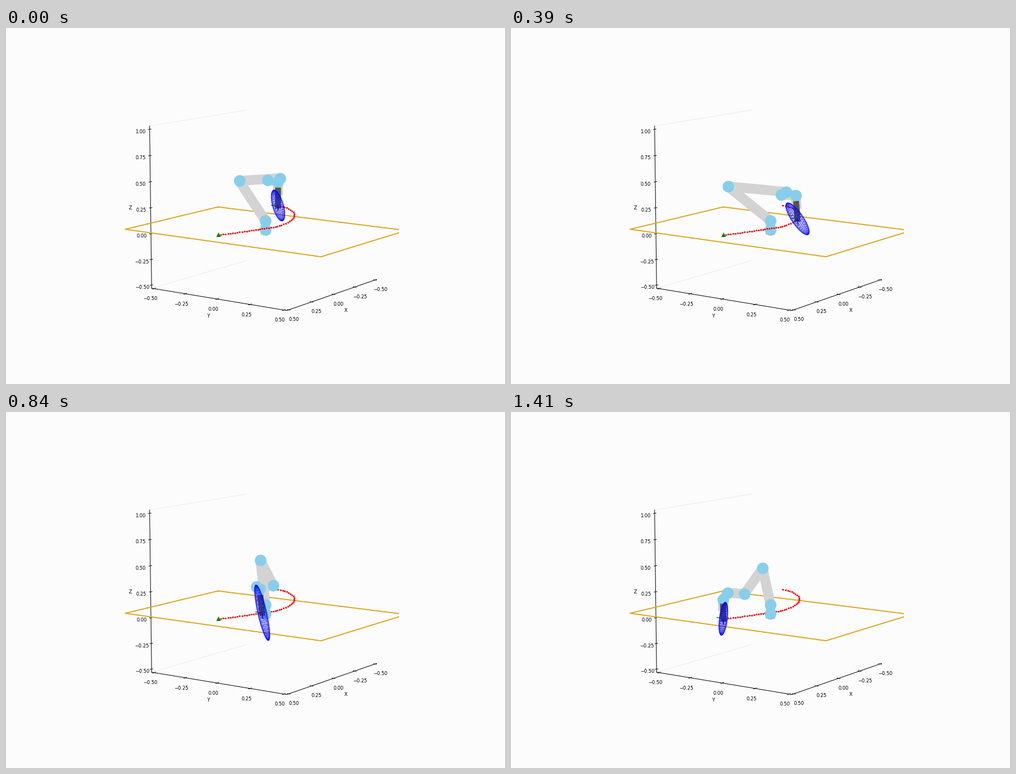
Animation of 885x632 px, one loop 1440 ms. Source, as a matplotlib script:

```python
import numpy as np
import matplotlib.pyplot as plt
from matplotlib.animation import FuncAnimation
from matplotlib.collections import LineCollection
from matplotlib.patches import Rectangle

W, H, DPI = 885, 632, 100
FRAMES, INTERVAL = 48, 30
PX = 72 / DPI  # points per pixel

# Camera: direction, distance (in half boxes), zoom and screen centre.
AZIM, ELEV = np.radians(35), np.radians(10)
DIST, ZOOM, CENTER = 20, 2890, (460.2, 313.0)
BOX_MID, BOX_HALF = np.array([0, 0, 0.25]), np.array([0.5, 0.5, 0.75]) * 25 / 24
UP = np.array([0, 0, 1])
NEAR = np.array([np.cos(AZIM), np.sin(AZIM), 0])
RIGHT = np.array([-np.sin(AZIM), np.cos(AZIM), 0])

# Arm lengths in metres: column, two links, three wrist offsets, tool included.
COLUMN, UPPER, FORE = 0.0892, 0.425, 0.392
SIDE, FRONT, FLANGE, REACH = 0.109, 0.0947, 0.0823, 0.225

# Waypoints of the tool tip: frame, then x, y, z.
WAYPOINTS = np.array([
    [0, 0.152, 0.202, 0.302], [5, 0.073, 0.227, 0.257],
    [9, 0.025, 0.238, 0.201], [13, 0.036, 0.233, 0.1535],
    [19, 0.129, 0.2115, 0.112], [30, 0.306, 0.156, 0.103],
    [47, 0.539, 0.025, 0.086]])
SLANTS = np.array([[0, 0.56], [20, 0.84], [28, 0.8], [35, 0.3], [47, -0.42]])
CROSSING = 23  # from here on the arm stands in front of the path


def smooth(keys):
    """Sample a cubic curve through (frame, values...) keys at every frame."""
    t, v = keys[:, 0], keys[:, 1:]
    slope = np.gradient(v, t, axis=0, edge_order=2)
    f = np.arange(FRAMES)
    i = np.clip(np.searchsorted(t, f, side="right") - 1, 0, len(t) - 2)
    h = (t[i + 1] - t[i])[:, None]
    s = (f - t[i])[:, None] / h
    return ((1 + 2 * s) * (1 - s) ** 2 * v[i] + s * (1 - s) ** 2 * h * slope[i]
            + s ** 2 * (3 - 2 * s) * v[i + 1] + s ** 2 * (s - 1) * h * slope[i + 1])


def bump(x, mid, width):
    return np.exp(-((x - mid) / width) ** 2)


def project(points):
    """World points to stage pixels, in perspective."""
    p = (np.asarray(points, float) - BOX_MID) / BOX_HALF
    near, side, up = p @ NEAR, p @ RIGHT, p[..., 2]
    depth = DIST - np.cos(ELEV) * near - np.sin(ELEV) * up
    rise = np.cos(ELEV) * up - np.sin(ELEV) * near
    return np.stack([CENTER[0] + ZOOM * side / depth,
                     CENTER[1] - ZOOM * rise / depth], axis=-1)


def solve_arm(frame, tip):
    """Joint positions, from the base to the tool mount, that reach the tip."""
    tilt = np.radians(24) * np.clip((frame - 27) / 20, 0, 1)
    sway = 0.016 * np.sin(np.pi * frame / (FRAMES - 1))
    tool = sway * RIGHT - REACH * (np.sin(tilt) * NEAR + np.cos(tilt) * UP)
    wrist3 = tip - tool

    out = np.sqrt(wrist3[0] ** 2 + wrist3[1] ** 2 - SIDE ** 2)
    turn = np.arctan2(wrist3[1], wrist3[0]) + np.arctan2(SIDE, out)
    ahead = np.array([np.cos(turn), np.sin(turn), 0])
    aside = np.array([np.sin(turn), -np.cos(turn), 0])
    wrist2 = wrist3 - FRONT * (np.cos(tilt) * ahead - np.sin(tilt) * UP)
    wrist1 = wrist2 - SIDE * aside

    shoulder = COLUMN * UP
    span = wrist1 - shoulder
    r = np.linalg.norm(span)
    bend = np.arccos((UPPER ** 2 + r ** 2 - FORE ** 2) / (2 * UPPER * r))
    lift = np.arctan2(span[2], span @ ahead) + bend
    elbow = shoulder + UPPER * (np.cos(lift) * ahead + np.sin(lift) * UP)
    mount = wrist3 + tool * FLANGE / REACH
    return np.array([0 * UP, shoulder, elbow, wrist1, wrist2, wrist3, mount])


def wireframe(center, hx, hy, slant, tilt=0.2, n=20):
    """Projected meridians and parallels of an ellipsoid."""
    cov = np.array([[hx ** 2, slant * hx * hy], [slant * hx * hy, hy ** 2]])
    size, axes = np.linalg.eigh(cov)
    minor, major = (np.sqrt(size) * axes).T

    def place(u, v):
        a = np.sin(v) * np.cos(u)
        b = np.cos(v) * np.cos(tilt) + np.sin(v) * np.sin(u) * np.sin(tilt)
        return center + a[:, None] * minor + b[:, None] * major

    around, down = np.linspace(0, 2 * np.pi, 49), np.linspace(0, np.pi, 33)
    return ([place(u, down) for u in 2 * np.pi * np.arange(n) / n]
            + [place(around, v) for v in np.pi * np.arange(1, n) / n])


fig = plt.figure(figsize=(W / DPI, H / DPI), dpi=DPI, facecolor="#fcfcfc")
ax = fig.add_axes([0, 0, 1, 1])
ax.set_xlim(0, W)
ax.set_ylim(H, 0)
ax.set_axis_off()


def line(points, color, width, z, **kw):
    x, y = np.transpose(points)
    return ax.plot(x, y, color=color, lw=width * PX, zorder=z, **kw)[0]


def dots(color, marker, size, z):
    return line([(0, 0)], color, 0, z, marker=marker, ls="", ms=size * PX, mew=0)


def label(x, y, text):
    ax.text(x, y, text, ha="center", va="center", fontsize=8.33 * PX,
            family="DejaVu Sans")


def corner(*signs):
    return BOX_MID + BOX_HALF * signs


def draw_axis(axis, edge, values, stroke, shift):
    """One box edge with its ticks and numbers; `edge` is its lower corner."""
    start, end = corner(*edge), corner(*edge)
    end[axis] += 2 * BOX_HALF[axis]
    line(project([start, end]), "black", 1, 1)
    for v in values:
        start[axis] = v
        mark = project(start)
        line([mark - stroke, mark + stroke], "black", 0.9, 1)
        label(*(mark + shift), f"{v:.2f}".replace("-", "\u2212"))


def draw_stage():
    for z in (-1, 1):
        line(project([corner(1, -1, z), corner(-1, -1, z)]), "#e6e6e6", 0.8, 0)
    span = np.linspace(-0.5, 0.5, 5)
    draw_axis(0, (-1, 1, -1), span, np.array([2.8, 0.5]), (9, 17.5))
    draw_axis(1, (1, -1, -1), span, np.array([2.7, -0.9]), (-6.7, 18.2))
    draw_axis(2, (1, -1, -1), np.linspace(-0.5, 1, 7), np.array([2.6, -0.4]),
              (-16.8, 4.3))
    label(603, 501, "X")
    label(359, 511.5, "Y")
    label(220.5, 319.5, "Z")

    floor = [(-0.5, -0.75, 0), (0.5, -0.75, 0), (0.5, 0.75, 0), (-0.5, 0.75, 0)]
    rim = line(project(floor + floor[:1]), "goldenrod", 1.9, 2)
    rim.set_clip_path(Rectangle((0, 0), 697, H, transform=ax.transData))


draw_stage()
tips = smooth(WAYPOINTS)
slants = smooth(SLANTS)[:, 0]
path = project(tips)

links = line([(0, 0)], "lightgray", 17.5, 4, solid_capstyle="projecting",
             solid_joinstyle="round")
joints = dots("skyblue", "o", 20.5, 5)
tool = line([(0, 0)], "#555555", 10.5, 5.5, solid_capstyle="projecting")
trail = dots("red", "o", 3.1, 6)
trail.set_data(*path.T)
goal = dots("green", "^", 7.2, 6)
goal.set_data(*path[-1:].T)
triad = [line([(0, 0)], c, 1.4, 7) for c in ("red", "green", "blue")]
ellipsoid = LineCollection([], colors="blue", linewidths=0.9 * PX, alpha=0.47,
                           zorder=8)
ax.add_collection(ellipsoid)


def update(frame):
    tip = path[frame]
    chain = project(solve_arm(frame, tips[frame]))
    links.set_data(*chain.T)
    joints.set_data(*chain[:-1].T)
    tool.set_data(*np.array([chain[-1], tip]).T)

    along = tip - chain[-1]
    arms = [(-2.5, 3), (-11.5, -0.3 - 0.045 * frame),
            10 * along / np.hypot(*along)]
    for ln, arm in zip(triad, arms):
        ln.set_data(*np.array([tip, tip + arm]).T)

    for marks in (trail, goal):
        marks.set_zorder(3 if frame >= CROSSING else 5.3)
    half_width = 8 + 13.2 * bump(frame, 15, 14)
    half_height = 27.5 + 24 * bump(frame, 31, 10)
    ellipsoid.set_segments(
        wireframe(tip, half_width, half_height, slants[frame]))
    return [links, joints, tool, trail, goal, ellipsoid, *triad]


anim = FuncAnimation(fig, update, frames=FRAMES, interval=INTERVAL,
                     repeat=True, repeat_delay=0, blit=False)
plt.show()
```
